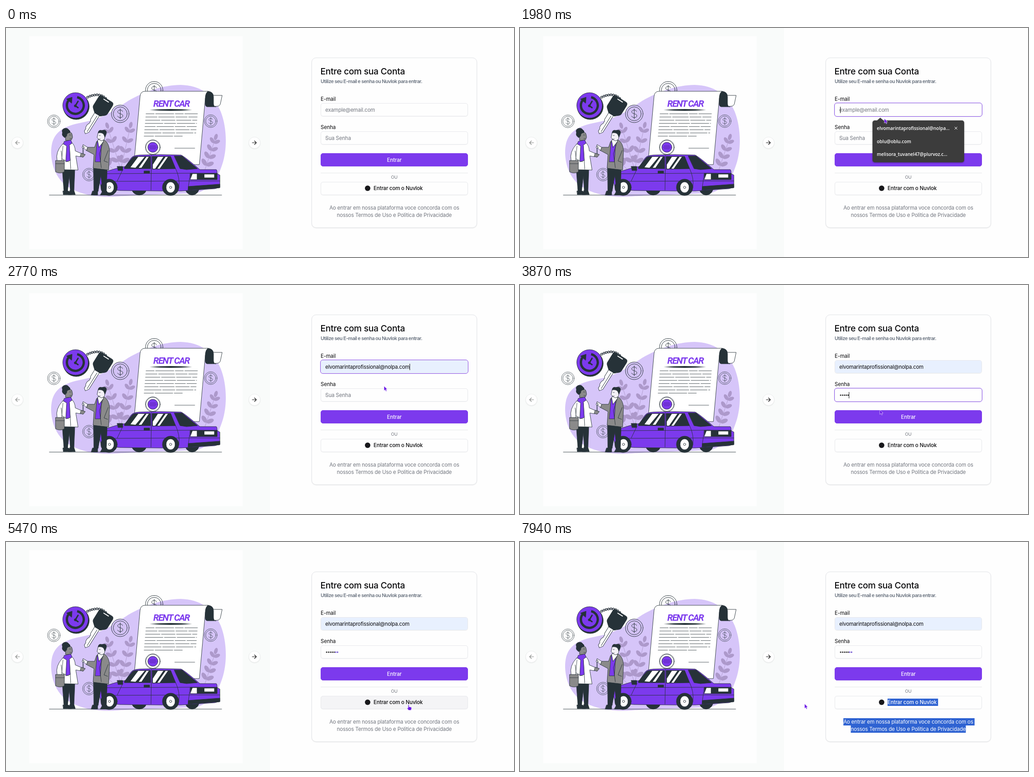
Recreate the animation shown at these times as an HTML page. Size 1114 by 503 pixels, loop 8000 ms.

```html
<!DOCTYPE html>
<html lang="pt">
<head>
<meta charset="utf-8">
<title>Login</title>
<style>
html,body{margin:0;width:100%;height:100%;overflow:hidden;background:#fefefe}
#stage{position:relative;width:1114px;height:503px;overflow:hidden;font:400 11.3px/16px Inter,sans-serif;letter-spacing:-.1px;color:#09090b}
#stage *{box-sizing:border-box}
#art{position:absolute;left:0;top:0}
.t,.box,.card,.ring,.menu,.nav,.rule{position:absolute;white-space:nowrap}
.card{left:670px;top:65px;width:363px;height:374px;border:1px solid #e2e4e8;border-radius:10px;background:#fefefe;box-shadow:0 1px 2px #00000014}
.box{left:690px;width:323px;height:29px;border:1px solid #e7e8ec;border-radius:5px;background:#fefefe;box-shadow:0 1px 1px #0000000a}
.box .t{left:9.3px;top:5.5px}
.muted{color:#71757e}
.mid{font-weight:500}
.center{left:690px;width:323px;text-align:center}
.ring{left:689px;width:325px;height:31px;border:1.4px solid #8c51ee;border-radius:6px;opacity:0}
.caret::after{content:"";display:inline-block;width:1px;height:14px;margin-left:.5px;vertical-align:-3px;background:#111}
.rule{left:690px;width:323px;height:1px;top:318px;background:#e6e7ea}
.nav{width:26px;height:26px;top:239px;border-radius:50%;background:#fff;border:1px solid #eceeee;box-shadow:0 1px 2px #0001}

.anim{animation:8s step-end infinite}
#mailRing{animation-name:mailRing}
#hint{animation-name:hint}
#mailCaret{left:10px;animation-name:mailCaret}
#mailFill{left:0;top:0;width:100%;height:100%;background:#e8f0fe;border-radius:4px;animation-name:mailFill}
#mailEnd{animation-name:mailEnd}
#passRing{animation-name:passRing}
#passHint{animation-name:passHint}
#dots{left:9.7px;top:6.5px;height:14px;box-sizing:content-box!important;overflow:hidden;border-right:1px solid #111;
 background:radial-gradient(circle at 2px 50%,#111 1.2px,#1110 1.75px) 0 0/4.1px 100%;animation-name:type,passCaret}
#dots::after{content:"";position:absolute;left:20.5px;top:0;width:8.2px;height:14px;
 background:radial-gradient(circle at 2px 50%,#4620c4 1.2px,#fff0 1.75px) 0 0/4.1px 100%,#fff}
#enter{background:#7c3aed;border-color:#7c3aed;animation:enter 8s linear infinite}
#other{animation:other 8s linear infinite}
@keyframes mailRing{0%{opacity:0}18.75%{opacity:1}37.5%{opacity:0}}
@keyframes hint{0%{opacity:1}27.5%{opacity:0}}
@keyframes mailCaret{0%{opacity:0}18.75%{opacity:1}27.5%{opacity:0}}
@keyframes mailFill{0%{opacity:0}27.5%{opacity:1}}
@keyframes mailEnd{0%{opacity:1}37.5%{opacity:0}}
@keyframes passRing{0%{opacity:0}37.5%{opacity:1}57.5%{opacity:0}}
@keyframes passHint{0%{opacity:1}41.25%{opacity:0}}
@keyframes passCaret{0%{border-color:#0000}37.5%{border-color:#111}57.5%{border-color:#0000}}
@keyframes type{0%{width:0}41.25%{width:4.1px}42.4%{width:8.2px}44.9%{width:12.3px}46%{width:16.4px}47.5%{width:20.5px}50%{width:24.6px}51.6%,100%{width:28.7px}}
@keyframes enter{0%,49%,56%,100%{background:#7c3aed}51%,54%{background:#894eef}}
@keyframes other{0%,63%,78.5%,100%{background:#fefefe}65%,76.5%{background:#f4f4f6}}

.menu{left:773px;top:203px;width:201px;height:92px;border-radius:5px;background:#3c3c3c;box-shadow:0 1px 3px #0006;color:#fff;font:600 10px/16px "Open Sans",sans-serif;letter-spacing:0;animation:menu 8s linear infinite}
.menu::before{content:"";position:absolute;left:10px;top:-6px;border:7px solid #0000;border-top:0;border-bottom:6px solid #3c3c3c}
.menu i{position:absolute;left:3px;top:4px;width:195px;height:28px;border-radius:4px;background:#5a5a5a;animation-name:row}
.menu .t{left:9.5px}
@keyframes menu{0%,22.25%,31.6%,100%{opacity:0}23.75%,29.75%{opacity:1}30.5%{opacity:.6}}
@keyframes row{0%{opacity:0}27.5%{opacity:1}}

.sel{position:relative;display:inline-block}
.sel::after{content:attr(data-t);position:absolute;inset:0 calc(var(--pad,0)*-1px) 0 0;text-align:left;background:#2f63d2;color:#fff;clip-path:inset(0 0 0 100%);animation:8s linear infinite}
#s1::after{animation-name:s1}
#s2::after{animation-name:s2}
#s3::after{animation:s3 8s step-end infinite}
@keyframes s1{0%,92.7%{clip-path:inset(0 0 0 100%)}92.75%{clip-path:inset(0 0 0 46%)}96.25%,100%{clip-path:inset(0)}}
@keyframes s2{0%,89.1%{clip-path:inset(0 0 0 100%)}92.7%{clip-path:inset(0 0 0 49%)}92.75%,100%{clip-path:inset(0)}}
@keyframes s3{0%{clip-path:inset(0 0 0 100%)}97.5%,100%{clip-path:inset(0)}}

#cursor{position:absolute;left:0;top:0;width:1px;height:1px;overflow:visible;animation:move 8s linear infinite,seen 8s step-end infinite}
#arrow{animation-name:arrow,tint}
#beam{animation-name:beam}
#hand{animation-name:hand}
#press{animation-name:press}
@keyframes seen{0%{visibility:hidden}2.125%,100%{visibility:visible}}
@keyframes move{
0%,2.125%{transform:translate(406px,489px);animation-timing-function:ease-in}
7%{transform:translate(690px,176px)}
11.4%{transform:translate(880px,402px);animation-timing-function:ease-in-out}
17.5%{transform:translate(782px,182px)}
19%,22.25%{transform:translate(773px,179px);animation-timing-function:ease-in-out}
27.5%,34.6%{transform:translate(829px,222px);animation-timing-function:ease-in-out}
37%,40%{transform:translate(790px,246px)}
42.4%,44.9%{transform:translate(790px,264px)}
48.4%{transform:translate(789px,274px)}
52%,54.2%{transform:translate(800px,303px);animation-timing-function:ease-in-out}
57.2%,59%{transform:translate(674px,217px);animation-timing-function:ease-in-out}
62.5%{transform:translate(752px,402px);animation-timing-function:ease-out}
65%{transform:translate(800px,357px)}
68.4%{transform:translate(883px,357px)}
71.6%{transform:translate(898px,352px)}
73.4%,75.9%{transform:translate(866px,346px)}
80%{transform:translate(785px,445px)}
85.9%{transform:translate(997px,410px)}
87%,88.5%{transform:translate(994px,405px)}
89.1%{transform:translate(977px,406px)}
92.5%{transform:translate(850px,406px)}
92.75%{transform:translate(842px,401px)}
96.25%{transform:translate(705px,384px)}
97.5%{transform:translate(665px,368px)}
99.25%,100%{transform:translate(624px,355.5px)}}
@keyframes arrow{0%{opacity:1}17.5%{opacity:0}23.5%{opacity:1}36.5%{opacity:0}41%{opacity:1}49.2%{opacity:0}55%{opacity:1}64.5%{opacity:0}76.6%,100%{opacity:1}}
@keyframes beam{0%{opacity:0}17.5%{opacity:1}23.5%{opacity:0}36.5%{opacity:1}41%{opacity:0}}
@keyframes hand{0%{opacity:0}49.2%{opacity:1}55%{opacity:0}64.5%{opacity:1}76.6%,100%{opacity:0}}
@keyframes tint{0%{fill:#6a17e6}87.3%{fill:#83778a}98.4%,100%{fill:#6a17e6}}
@keyframes press{0%{opacity:0}18.75%{opacity:.72}21.25%{opacity:0}28.5%{opacity:.72}29.9%{opacity:0}37%{opacity:.72}38.3%{opacity:0}57.2%{opacity:.72}58.8%{opacity:0}87.3%{opacity:.72}98.4%,100%{opacity:0}}
</style>
</head>
<body>
<div id="stage">
<svg id="art" width="1114" height="503" fill="none" stroke="#263238" stroke-width=".9" stroke-linejoin="round" stroke-linecap="round">
<defs>
 <g id="coin"><circle r="14"/><circle r="11"/><path d="M3.8-3.8C2.5-7.2-4-6.6-4-3.2C-4 .7 4.2-.8 4.2 3.2C4.2 6.8-3 7-4.2 3.6M0-8V8"/></g>
</defs>
<g stroke="none">
 <path fill="#f9fbfa" d="M0 0H579V503H0Z"/>
 <path fill="#fefefe" d="M51 18H519V486H51Z"/>
 <path fill="#d6c5f9" d="M99 276C98 235 118 217 165 208C218 198 240 178 268 160C303 140 345 125 383 125C425 126 455 146 471 184C485 220 486 270 472 306C462 335 446 354 420 362C360 366 300 366 245 370C190 374 150 362 126 341C108 324 100 300 99 276Z"/>
</g>
<g id="plants" fill="#ad99cb" stroke="#ad99cb"></g>
<g stroke-width=".7">
 <use href="#coin" transform="translate(105 205)" fill="#fff"/>
 <use href="#coin" transform="translate(250.5 188.5)scale(1.38)" fill="#d3c2f5"/>
 <use href="#coin" transform="translate(325 136.500)scale(1.36)"/>
 <use href="#coin" transform="translate(449 204.500)"/>
 <use href="#coin" transform="translate(182 322)"/>
</g>

<!-- contract -->
<path fill="#fff" stroke="none" d="M450 148H474L470 167Q468 173 459 172H448Z"/>
<path d="M454 148H474L470 167Q468 173 459 172"/>
<path fill="#fff" d="M282 282L294 150Q295 139 305 139H443Q438 145 437 155L424 300H282Z"/>
<path fill="#263238" d="M443 139Q455 140 455 151V166Q455 173 461 173H441Q436 172 437 163V155Q437 143 443 139Z"/>
<path fill="#263238" stroke="none" d="M315 180Q361 176 408 180Q361 184 315 180Z"/>
<text x="323" y="173" fill="#7c3aed" stroke="none" font-family="Roboto,sans-serif" font-weight="700" font-style="italic" font-size="20" letter-spacing="-1.5">RENT CAR</text>
<g id="lines" stroke-width=".8"></g>
<path d="M370 264H414" stroke-width=".8"/>
<circle cx="322" cy="262" r="15.500" fill="#fff"/><circle cx="322" cy="262" r="16.500" stroke-dasharray="1.500 1.700"/>
<circle cx="322" cy="262" r="11" fill="#7c3aed"/><path stroke="#4c1d95" stroke-width=".8" d="M316 259H328M314 262H330M316 265H328"/>

<!-- clock, chain and key -->
<circle cx="154" cy="172.500" r="28.500" fill="#263238"/><circle cx="152.500" cy="170" r="28" fill="#7c3aed"/>
<path stroke-width="5" stroke-linecap="butt" d="M140 156A18.500 18.500 0 1 0 156 152"/>
<path fill="#263238" d="M133 156L145 152L144 165Z"/>
<path stroke-width="3" d="M152 171L158 161M152 171L158 175"/><circle cx="152" cy="171" r="2.500" fill="#263238"/>
<path d="M179 152Q205 140 220 156" stroke-width="5.500" stroke-dasharray="0 5.300"/>
<path d="M179 152Q205 140 220 156" stroke="#d9d5df" stroke-width="3" stroke-dasharray="0 5.300"/>
<g transform="translate(211 173)rotate(32)">
 <path fill="#fff" d="M-7 18H5V63L0 70L-5 66V60L-7 57V50L-5 47V40L-7 37Z"/><path d="M1 23V64"/>
 <path fill="#263238" d="M-12-20H12Q18-20 18-14V7Q18 11 14 14L7 20H-7L-14 14Q-18 11-18 7V-14Q-18-20-12-20Z"/>
 <path stroke="#fff" stroke-width="2" d="M-6-16H6"/>
</g>

<!-- car -->
<path d="M95 367H473"/>
<path fill="#263238" d="M274 350H309Q308 366 292 367Q277 366 274 350ZM391 345H425Q424 366 408 367Q393 366 391 345Z"/>
<path fill="#7c3aed" d="M204 335Q204 320 217 316Q240 308 262 304L274 286Q278 280 292 279Q340 277 384 279Q394 284 425 311L461 311Q463 312 463 320L469 323V350L458 353L384 358H340L250 357L210 353Z"/>
<path fill="#263238" d="M260 306L277 285Q280 282 288 282H317V309H260ZM321 282H361L372 309L321 310ZM369 281H386L420 309L396 311L382 309Z"/>
<path fill="#fff" stroke="none" d="M273 306L290 283H304L284 307ZM308 283H313L297 307H291ZM322 300L333 283H345L327 309H322ZM350 283H355L337 309H332Z"/>
<path d="M319 280L318 356M213 320L404 319L463 320M210 337L399 336L469 336M372 309Q382 330 379 350M256 311L244 336M404 319L399 356"/>
<path fill="#263238" d="M244 304H256V313H246ZM303 314H315V319H303ZM405 319H463V333H405ZM400 348L469 343V351L400 356Z"/>
<path fill="#fff" d="M409 320H419V333H404ZM435 321H457V329H435Z"/>
<g fill="#263238"><circle cx="226" cy="350" r="18"/><circle cx="361" cy="350" r="18"/></g>
<g fill="#fff"><ellipse cx="227" cy="350" rx="10" ry="12"/><ellipse cx="361" cy="350" rx="10" ry="12"/><circle cx="227" cy="350" r="2.500"/><circle cx="361" cy="350" r="2.500"/></g>

<!-- woman -->
<path fill="#263238" d="M125 309H151L149 358H141L139 325L135 358H127L124 318ZM125 358H137L144 366H126ZM140 357H149L152 366H137Z"/>
<path fill="#fff" d="M124 255L143 251Q151 256 152 270L166 276L164 283L153 281L158 312L122 311L112 291Q108 272 124 255Z"/>
<path d="M139 260L142 310M121 270L123 288L137 294"/>
<path fill="#8a8a8a" d="M109 291H128V316Q118 321 109 316ZM165 275L174 278L169 284L163 282ZM131 231Q144 226 145 234L146 240L144 245Q142 248 138 247H131Z"/>
<path stroke-width=".8" d="M109 298H128M125 259L122 291M139 235H142M140 243H143"/>
<path fill="#263238" d="M129 241Q121 236 124 230Q121 224 127 221Q134 218 138 224Q142 226 140 230Q133 230 133 237Z"/>
<path fill="#7c3aed" d="M128 249L142 246L145 253L139 257L141 291L131 294L133 259L126 255Z"/>

<!-- man -->
<path fill="#263238" d="M192 305H222L220 359H212L208 323L202 359H193ZM190 358H201V367H187ZM212 358H221L223 367H207Z"/>
<path fill="#8a8a8a" d="M199 249L216 246Q226 253 227 270L225 312L191 308L193 278L176 269L179 262L194 262Z"/>
<path fill="#7c3aed" d="M200 250L210 248L207 294H196Z"/>
<path fill="#fff" d="M201 246L212 244L214 249L204 262Z"/>
<path d="M213 250L205 276L209 307M224 269L215 292L223 295"/>
<path fill="#f4f1f7" d="M202 231Q207 228 217 231L216 244Q209 251 204 245L200 241ZM179 262L169 256L168 261L176 269Z"/>
<path fill="#263238" d="M202 230Q203 223 210 225Q222 222 220 232L217 240L214 233Q209 229 202 230Z"/>
<path stroke-width=".8" d="M204 236H207M203 244H207"/>
<path stroke-width="1.500" d="M169 260V276"/><circle cx="169" cy="262" r="2" fill="#fff"/>
</svg>

<div class="nav" style="left:12px"></div><div class="nav" style="left:531.5px"></div>
<svg style="position:absolute;left:0;top:0" width="579" height="503" fill="none" stroke-width="1.200" stroke-linecap="round" stroke-linejoin="round">
<path stroke="#858886" d="M30 252H21L25 248M21 252L25 256"/><path stroke="#111" d="M540 252H549L545 248M549 252L545 256"/></svg>

<div class="card"></div>
<div class="t mid" style="left:689.5px;top:83px;font-size:19.2px;line-height:24px;letter-spacing:-.27px">Entre com sua Conta</div>
<div class="t" style="left:690px;top:110px;font-size:10.8px;font-weight:600;letter-spacing:-.6px;color:#6b7480">Utilize seu E-mail e senha ou Nuvlok para entrar.</div>
<div class="t" style="left:690px;top:147.500px">E-mail</div>
<div class="box" style="top:165px">
 <div id="hint" class="t muted anim">example@email.com</div>
 <div id="mailCaret" class="t caret anim"></div>
 <div id="mailFill" class="t anim"><div class="t" style="letter-spacing:-.2px">elvomarintaprofissional@nolpa.com<span id="mailEnd" class="caret anim"></span></div></div>
</div>
<div id="mailRing" class="ring anim" style="top:164px"></div>
<div class="t" style="left:690px;top:209.500px">Senha</div>
<div class="box" style="top:227px">
 <div id="passHint" class="t muted anim">Sua Senha</div>
 <div id="dots" class="t anim"></div>
</div>
<div id="passRing" class="ring anim" style="top:226px"></div>
<div id="enter" class="box" style="top:275px"></div>
<div class="t center mid" style="top:281.500px;color:#fff">Entrar</div>
<div class="rule"></div>
<div class="t center muted" style="top:320px;font-size:9.6px">OU</div>
<div id="other" class="box" style="top:338px"></div>
<div class="t" style="left:787px;top:346px;width:12px;height:12px;border-radius:50%;background:#18181b"></div>
<div class="t mid" style="left:806px;top:344px"><span id="s3" class="sel" style="--pad:3" data-t="Entrar com o Nuvlok">Entrar com o Nuvlok</span></div>
<div class="t center muted" style="top:387px"><span id="s1" class="sel" style="--pad:3" data-t="Ao entrar em nossa plataforma voce concorda com os">Ao entrar em nossa plataforma voce concorda com os</span></div>
<div class="t center muted" style="top:403px"><span id="s2" class="sel" data-t="nossos Termos de Uso e Politica de Privacidade">nossos Termos de Uso e Politica de Privacidade</span></div>

<div class="menu"><i class="anim"></i>
 <div class="t" style="top:9px">elvomarintaprofissional@nolpa...</div>
 <div class="t" style="top:38px">oblu@oblu.com</div>
 <div class="t" style="top:66px">melisora_tuvanel47@plurvoz.c...</div>
 <svg style="position:absolute;left:179px;top:13px" width="8" height="8" stroke="#fff"><path d="M1 1L7 7M7 1L1 7"/></svg>
</div>

<svg id="cursor">
 <circle id="press" class="anim" r="8.500" fill="#fbef1e"/>
 <path id="arrow" class="anim" d="M0 0V10.200L2.400 8L4.100 11.600L5.900 10.700L4.200 7.300H7.300Z" stroke="#fff" stroke-width=".6"/>
 <path id="beam" class="anim" d="M-2-5Q0-5 0-3.500Q0-5 2-5M0-4V4M-2 5Q0 5 0 3.500Q0 5 2 5" fill="none" stroke="#8a8560" stroke-width=".9"/>
 <path id="hand" class="anim" d="M-1 1Q0-.5 1 1V5L5 5.500Q7 6 6.500 8.500L5.500 12.500H0L-3 8.500Q-3 6.500-1 8Z" fill="#6a17e6" stroke="#fff" stroke-width=".6"/>
</svg>
</div>
<script>
const fill = (id, html) => document.getElementById(id).innerHTML = html;

// straight stem with paired leaves, narrowing towards the tip
function plant(x0, y0, x1, y1, pairs) {
  const dir = Math.atan2(y1 - y0, x1 - x0) * 180 / Math.PI;
  const leaf = (x, y, turn, size) =>
    `<ellipse cx="${size}" rx="${size}" ry="${size * .55}" stroke="none" transform="translate(${x} ${y})rotate(${dir + turn})"/>`;
  let out = `<path d="M${x0} ${y0}L${x1} ${y1}"/>` + leaf(x1, y1, 0, 7);
  for (let i = 0; i < pairs; i++) {
    const k = (i + .6) / pairs, x = x0 + (x1 - x0) * k, y = y0 + (y1 - y0) * k;
    out += leaf(x, y, 50, 9 - 2 * k) + leaf(x, y, -50, 9 - 2 * k);
  }
  return out;
}
fill('plants', plant(250, 306, 224, 221, 4) + plant(252, 308, 272, 220, 4) + plant(436, 312, 458, 246, 4) + plant(236, 312, 204, 278, 2));

let rows = '';
for (let i = 0; i < 8; i++) {
  const y = 188.5 + i * 7, x = 307 - i * .6;
  rows += `<path d="M${x} ${y}H${x + (i < 7 ? 113 : 84)}" stroke-dasharray="${18 + i * 7 % 23} 3 ${40 - i * 5 % 17} 3"/>`;
}
fill('lines', rows);
</script>
</body>
</html>
```
